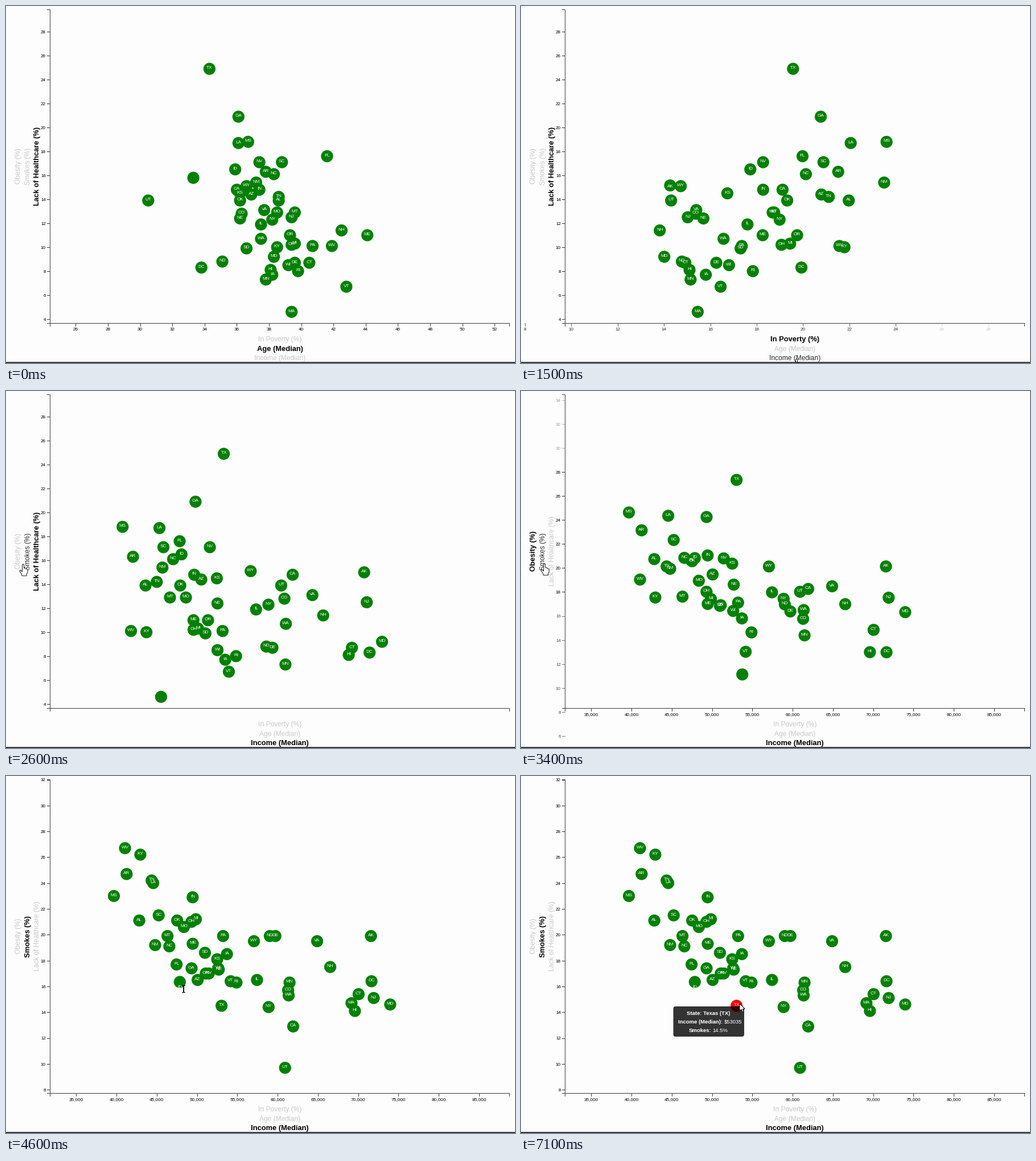
Write a matplotlib script that moves like this. It is 894 px wide and 626 px high and loops after 7.2 s.

```python
import numpy as np
import matplotlib.pyplot as plt
from matplotlib.animation import FuncAnimation
from matplotlib.patches import FancyBboxPatch, Polygon

W, H, DPI = 894, 626, 100
LOOP, STEP = 7200, 100
LEFT, BOTTOM, PLOT_W, PLOT_H = 77.2, 555.6, 807, 550
MOVE = 1000  # length of one chart transition, ms

STATES = """AL AK AZ AR CA CO CT DE DC FL GA HI ID IL IN IA KS KY LA ME MD MA MI MN MS MO
MT NE NV NH NJ NM NY NC ND OH OK OR PA RI SC SD TN TX UT VT VA WA WV WI WY""".split()

poverty = [19.3, 11.2, 18.2, 18.9, 16.4, 12, 10.8, 12.5, 17.7, 16.5, 18.3, 11.4, 14.8,
           14.4, 15.2, 12.2, 13.6, 19.1, 19.8, 14.1, 10.1, 11.6, 16.2, 11.5, 21.5, 15.5,
           15.4, 12.4, 15.2, 9.2, 11.1, 21.3, 15.9, 17.2, 11.5, 15.8, 16.6, 16.6, 13.6,
           14.3, 18, 14.2, 18.3, 17.2, 11.7, 12.2, 11.8, 13.2, 18.3, 13.2, 11.2]
age = [38.6, 33.3, 36.9, 37.8, 36, 36.3, 40.5, 39.6, 33.8, 41.6, 36.1, 38.1, 35.9,
       37.5, 37.4, 38.2, 36.2, 38.5, 36.1, 44.1, 38.3, 39.4, 39.6, 37.8, 36.7, 38.5,
       39.6, 36.2, 37.4, 42.5, 39.4, 37.2, 38.2, 38.3, 35.1, 39.4, 36.2, 39.3, 40.7,
       39.8, 38.8, 36.6, 38.6, 34.3, 30.5, 42.8, 37.7, 37.5, 41.9, 39.2, 36.6]
income_k = [42.83, 71.58, 50.07, 41.26, 61.93, 61.3, 70.05, 59.72, 71.65, 47.46, 49.32,
            69.59, 47.86, 57.44, 49.45, 53.71, 52.5, 42.96, 44.56, 49.46, 73.97, 69.16,
            49.85, 61.48, 39.68, 48.36, 46.33, 52.69, 51.45, 66.53, 71.92, 44.8, 58.88,
            46.56, 59.03, 49.31, 47.53, 51.08, 53.23, 54.89, 45.24, 50.98, 44.36, 53.04,
            60.92, 54.17, 64.9, 61.37, 41.06, 52.62, 57.06]
health = [13.9, 15, 14.4, 16.3, 14.8, 12.8, 8.7, 8.7, 8.3, 17.6, 20.9, 8.1, 16.5,
          11.9, 14.8, 7.7, 14.5, 10, 18.7, 11, 9.2, 4.6, 10.3, 7.3, 18.8, 12.9,
          12.9, 12.4, 17.1, 11.4, 12.5, 15.4, 12.3, 16.1, 8.8, 10.2, 13.9, 11, 10.1,
          8, 17.1, 9.9, 14.2, 24.9, 13.9, 6.7, 13.1, 10.7, 10.1, 8.5, 15.1]
smokes = [21.1, 19.9, 16.5, 24.7, 12.9, 15.7, 15.4, 19.9, 16.4, 17.7, 17.4, 14.1, 15.9,
          16.5, 22.9, 18.5, 18.1, 26.2, 24, 19.3, 14.6, 14.7, 21.2, 16.3, 23, 20.6,
          19.9, 17.3, 17, 17.5, 15.1, 19.2, 14.4, 19.1, 19.9, 21, 21.1, 17, 19.9,
          16.3, 21.5, 18.6, 24.2, 14.5, 9.7, 16.4, 19.5, 15.3, 26.7, 17.4, 19.5]
obesity = [33.5, 29.7, 28.9, 35.9, 24.7, 21.3, 26.3, 30.7, 21.7, 26.2, 30.5, 22.1, 28.9,
           29.3, 32.7, 30.9, 31.3, 31.6, 34.9, 28.2, 29.6, 23.3, 30.7, 27.6, 35.5, 30.2,
           26.4, 30.2, 27.7, 27.4, 26.9, 28.4, 27, 29.7, 32.2, 32.6, 33, 27.9, 30.2,
           27, 32.1, 29.8, 31.2, 31.9, 25.7, 24.8, 28.5, 27.3, 35.7, 31.2, 29.5]


class Scale:
    def __init__(self, values, horizontal, step=2):
        self.values = np.array(values)
        self.lo, self.hi = self.values.min() * 0.8, self.values.max() * 1.2
        self.horizontal = horizontal
        first = int(np.ceil(self.lo / step)) * step
        self.ticks = set(range(first, int(self.hi) + 1, step))

    def __call__(self, v):
        k = (v - self.lo) / (self.hi - self.lo)
        return LEFT + k * PLOT_W if self.horizontal else BOTTOM - k * PLOT_H


SCALES = {
    "In Poverty (%)": Scale(poverty, True),
    "Age (Median)": Scale(age, True),
    "Income (Median)": Scale(np.array(income_k) * 1000, True, 5000),
    "Obesity (%)": Scale(obesity, False),
    "Smokes (%)": Scale(smokes, False),
    "Lack of Healthcare (%)": Scale(health, False),
}
X_CLICKS = [(-MOVE, "Age (Median)"), (868, "In Poverty (%)"), (1796, "Income (Median)")]
Y_CLICKS = [(-MOVE, "Lack of Healthcare (%)"), (2957, "Obesity (%)"), (3600, "Smokes (%)")]
CLICKS = [(868, "In Poverty (%)", "Lack of Healthcare (%)"),
          (1796, "Income (Median)", "Lack of Healthcare (%)"),
          (2957, "Income (Median)", "Obesity (%)"),
          (3600, "Income (Median)", "Smokes (%)")]
# A circle touched by the pointer stops: click time -> (state, time of touch)
TOUCHED = {1796: ("MA", 1985), 3600: ("ID", 4269)}
HOVERS = [(600, 868, "In Poverty (%)"), (1350, 1796, "Income (Median)"),
          (2450, 2700, "Smokes (%)"), (2700, 2957, "Obesity (%)"),
          (3250, 3600, "Smokes (%)")]
TIP_TIME = 5400

POINTER = np.array([
    (0, 478, 660), (300, 478, 650), (600, 480, 586), (1000, 480, 586), (1400, 484, 619),
    (1800, 484, 619), (1985, 272, 536), (2500, 31, 306), (2600, 30, 304), (2900, 22, 303),
    (3000, 22, 303), (3300, 41, 303), (3650, 42, 303), (4269, 306, 366), (4500, 312, 373),
    (4950, 312, 373), (5400, 379, 396), (6300, 379, 396), (6500, 384, 399)])
POINTER_KINDS = [(0, "hand"), (1850, "arrow"), (2450, "hand"), (3750, "arrow"),
                 (4269, "beam"), (5000, "arrow")]
SHAPES = {
    "arrow": [(0, 0), (0, 13), (3, 10.3), (5.2, 15), (7.2, 14.1), (5.2, 9.6), (9.3, 9.6)],
    "hand": [(-1.4, 0.5), (0, -0.4), (1.4, 0.5), (1.6, 6.5), (4, 7), (6, 8), (8, 9.5),
             (8, 14), (6.3, 17), (6.3, 20), (-2, 20), (-2.5, 17), (-6, 12), (-5.5, 10),
             (-4, 10.3), (-1.6, 13)],
    "beam": [(-2.5, -6), (0, -5.3), (2.5, -6), (0.4, -5), (0.4, 6), (2.5, 7), (0, 6.3),
             (-2.5, 7), (-0.4, 6), (-0.4, -5)],
}


def ease(start, now):
    u = np.clip((now - start) / MOVE, 0, 1)
    return 4 * u**3 if u < 0.5 else 1 - 4 * (1 - u)**3


def current(items, t):
    return [item[1] for item in items if item[0] <= t][-1]


def tick_state(value, clicks, t):
    """Position and opacity of one tick, carried through each rescaling."""
    old = SCALES[clicks[0][1]]
    pos, alpha = old(value), float(value in old.ticks)
    for i, (start, name) in enumerate(clicks[1:], 1):
        if t <= start:
            break
        end = clicks[i + 1][0] if i + 1 < len(clicks) else LOOP
        new = SCALES[name]
        p = ease(start, min(t, end))
        if alpha < 1e-3:
            pos = old(value)
        pos += (new(value) - pos) * p
        alpha += ((value in new.ticks) - alpha) * p
        old = new
    return pos, alpha


def positions(t, circles):
    x_scale, y_scale = SCALES["Age (Median)"], SCALES["Lack of Healthcare (%)"]
    pts = np.column_stack([x_scale(x_scale.values), y_scale(y_scale.values)])
    if circles:
        pts[STATES.index("AK"), 1] = 301.3
    for i, (start, x_name, y_name) in enumerate(CLICKS):
        if t <= start:
            break
        now = min(t, CLICKS[i + 1][0]) if i + 1 < len(CLICKS) else t
        p = np.full((len(STATES), 1), ease(start, now))
        if circles and start in TOUCHED:
            state, stop = TOUCHED[start]
            p[STATES.index(state)] = ease(start, min(now, stop))
        xs, ys = SCALES[x_name], SCALES[y_name]
        goal = np.column_stack([xs(xs.values), ys(ys.values)])
        pts = pts + (goal - pts) * p
    return pts


fig = plt.figure(figsize=(W / DPI, H / DPI), dpi=DPI, facecolor="#fdfdfe")
ax = fig.add_axes([0, 0, 1, 1])
ax.set(xlim=(0, W), ylim=(H, 0))
ax.axis("off")
PX = 72 / DPI


def write(x, y, text, size, ha="center", **kw):
    return ax.text(x, y, text, fontsize=size * PX, family="Liberation Sans", ha=ha,
                   va="baseline", **kw)


def line(xs, ys, color="#3c3c3c", width=1.0, **kw):
    return ax.plot(xs, ys, color=color, lw=width * PX, **kw)[0]


TOP, RIGHT = BOTTOM - PLOT_H, LEFT + PLOT_W
line([72, LEFT, LEFT, 72], [TOP + 0.4, TOP + 0.4, BOTTOM, BOTTOM])
line([LEFT, LEFT, RIGHT, RIGHT], [561, BOTTOM, BOTTOM, 561])
line([0, W], [625.2, 625.2], "black", 1.5, zorder=9)


def make_ticks(clicks):
    values = set().union(*(SCALES[name].ticks for _, name in clicks))
    return {v: (line([], []), write(0, 0, f"{v:,}", 8.2)) for v in values}


x_ticks, y_ticks = make_ticks(X_CLICKS), make_ticks(Y_CLICKS)

titles = {}
for title, y in zip(list(SCALES)[:3], (588, 604.5, 620.5)):
    titles[title] = write(481, y, title, 12)
for title, x in zip(list(SCALES)[3:], (25.5, 41.7, 58.3)):
    titles[title] = write(x, 281, title, 12, rotation=90, rotation_mode="anchor")

dots = ax.scatter(np.zeros(len(STATES)), np.zeros(len(STATES)), s=(21.2 * PX)**2,
                  linewidths=0, zorder=3)
names = [write(0, 0, s, 8.2, color="white", zorder=4) for s in STATES]

tip = [ax.add_patch(FancyBboxPatch((271, 407.5), 117.5, 46, zorder=5, lw=0,
                                   boxstyle="round,pad=3.5,rounding_size=4",
                                   facecolor=(0, 0, 0, 0.8)))]
tip.append(write(329.5, 419.3, "State: Texas (TX)", 9.5, color="white", weight="bold", zorder=6))
for key, value, x, y in (("Income (Median):", "$53035", 354, 434.2),
                         ("Smokes:", "14.5%", 334, 449)):
    tip.append(write(x, y, key, 9.5, "right", color="white", weight="bold", zorder=6))
    tip.append(write(x + 2.6, y, value, 9.5, "left", color="white", zorder=6))

pointer = ax.add_patch(Polygon([(0, 0), (1, 1), (2, 0)], fc="white", ec="black",
                               lw=0.9 * PX, zorder=8))


def draw_ticks(ticks, clicks, t, horizontal):
    for value, (mark, text) in ticks.items():
        pos, alpha = tick_state(value, clicks, t)
        shown = alpha > 0.02 and -20 < pos < (W if horizontal else H) + 20
        for artist in (mark, text):
            artist.set_visible(shown)
            artist.set_alpha(min(alpha, 1))
        if not shown:
            continue
        if horizontal:
            mark.set_data([pos, pos], [BOTTOM, 561])
            text.set_position((pos, 568.6))
        else:
            mark.set_data([72, LEFT], [pos, pos])
            text.set_position((70, pos + 2.9))
            text.set_ha("right")


def draw(frame):
    t = frame * STEP
    draw_ticks(x_ticks, X_CLICKS, t, True)
    draw_ticks(y_ticks, Y_CLICKS, t, False)

    active = {current(X_CLICKS, t), current(Y_CLICKS, t)}
    hovered = {name for a, b, name in HOVERS if a <= t < b}
    for name, text in titles.items():
        bold = name in active
        text.set_weight("bold" if bold else "normal")
        text.set_fontsize((12.9 if bold else 12) * PX)
        text.set_color("black" if bold else "#2a2a2a" if name in hovered else "#c9c9c9")

    dots.set_offsets(positions(t, circles=True))
    colors = np.tile([0, 128 / 255, 0, 1.0], (len(STATES), 1))
    k = ease(TIP_TIME, t)
    colors[STATES.index("TX")] = (k, (1 - k) * 128 / 255, 0, 1)
    dots.set_facecolors(colors)
    for text, (x, y) in zip(names, positions(t, circles=False)):
        text.set_position((x, y + 0.3))

    for artist in tip:
        artist.set_visible(t >= TIP_TIME)

    kind = current(POINTER_KINDS, t)
    spot = [np.interp(t, POINTER[:, 0], POINTER[:, i]) for i in (1, 2)]
    pointer.set_xy(np.array(SHAPES[kind]) + spot)
    return []


anim = FuncAnimation(fig, draw, frames=LOOP // STEP, interval=STEP, repeat=True,
                     repeat_delay=0, blit=False)
plt.show()
```
